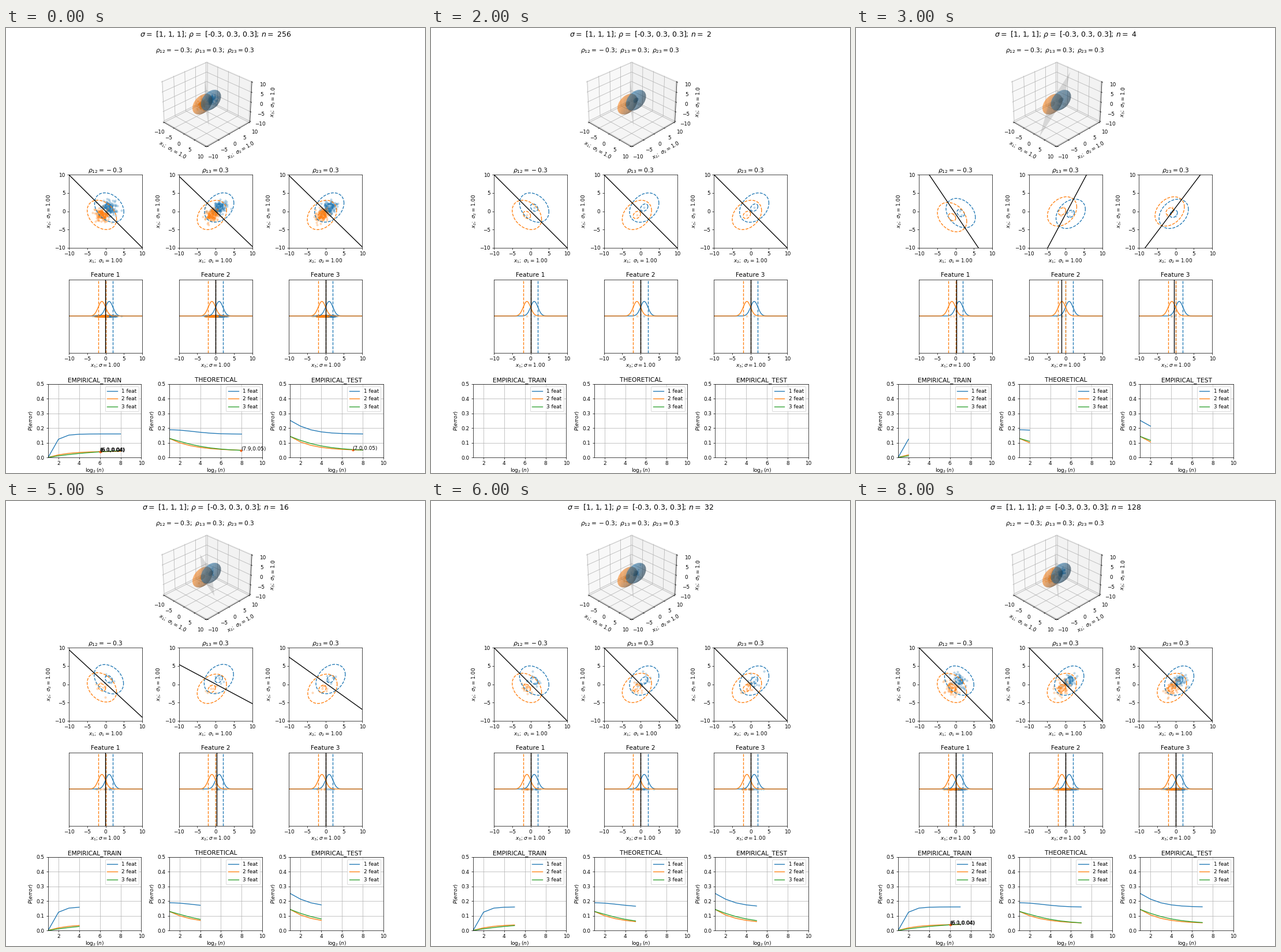
These frames come from a looping animation (726x771 px, 9 s). A matplotlib script:

```python
import numpy as np
import matplotlib.pyplot as plt
from matplotlib.animation import ArtistAnimation

W, H, DPI = 726, 771, 64
BLUE, ORANGE = "C0", "C1"
PAIRS = [(0, 1), (0, 2), (1, 2)]
TICKS = range(-10, 11, 5)
COV = np.array([[1, -.3, .3], [-.3, 1, .3], [.3, .3, 1]])
ROOT = np.linalg.cholesky(COV)
# how far the first sample means lie from the true ones
SHIFT = {BLUE: np.array([.4, -1.5, -1.7]), ORANGE: np.array([.05, -.6, .95])}
CENTER = {BLUE: 1, ORANGE: -1}


def rise(top, rate):
    return lambda k: top * (1 - np.exp(-rate * (k - 1)))


def decay(low, span, scale, power=1):
    return lambda k: low + span * np.exp(-((k - 1) / scale) ** power)


# error against k = log2(n), for 1, 2 and 3 features
ERRORS = {
    "EMPIRICAL_TRAIN": (rise(.16, 1.5), rise(.042, .55), rise(.062, .19)),
    "THEORETICAL": (decay(.159, .03, 3.2, 2), decay(.045, .085, 2.3),
                    decay(.042, .088, 3.1, 1.2)),
    "EMPIRICAL_TEST": (decay(.159, .093, 1.75, 1.1), decay(.047, .096, 2),
                       decay(.043, .1, 2.9, 1.1)),
}

fig = plt.figure(figsize=(W / DPI, H / DPI), dpi=DPI, facecolor="white")


def add_axes(x, y, w, h, **kw):
    return fig.add_axes([x / W, 1 - (y + h) / H, w / W, h / H], **kw)


def rho(i, j):
    return rf"\rho_{{{i + 1}{j + 1}}}={COV[i, j]:.1f}"


def name(i, digits=2):
    return rf"$x_{i + 1};\ \sigma_{i + 1}={1:.{digits}f}$"


def make_cube():
    ax = add_axes(261, 46.3, 168.7, 168.7, projection="3d")
    ax.view_init(elev=30, azim=-45)
    lim = 10 * 25 / 24
    ax.set(xlim=(-lim, lim), ylim=(-lim, lim), zlim=(-lim, lim),
           xticks=TICKS, yticks=TICKS, zticks=TICKS,
           xlabel=name(0, 1), ylabel=name(1, 1), zlabel=name(2, 1))
    ax.set_title("$" + r";\ ".join(rho(i, j) for i, j in PAIRS) + "$",
                 y=1, pad=4.7)
    ax.title.set_y(1)  # 3D axes lower their title
    return ax


def make_pair(k):
    i, j = PAIRS[k]
    ax = add_axes(109 + 190.6 * k, 254, 127, 127)
    ax.set(xlim=(-10, 10), ylim=(-10, 10), xticks=TICKS, yticks=TICKS,
           ylabel=name(j))
    ax.set_xlabel(name(i), labelpad=1)
    ax.set_title(f"${rho(i, j)}$", pad=4.7)
    return ax


def make_feature(k):
    ax = add_axes(109 + 190.6 * k, 435.5, 127, 127)
    ax.set(xlim=(-10, 10), ylim=(-1, 1), xticks=TICKS, yticks=[])
    ax.set_xlabel(rf"$x_{k + 1};\sigma=1.00$", labelpad=1)
    ax.set_title(f"Feature {k + 1}", pad=4.7)
    x = np.linspace(-10, 10, 400)
    for color, mu in CENTER.items():
        ax.plot(x, np.exp(-(x - mu) ** 2 / 2) / np.sqrt(2 * np.pi), color=color)
        for edge in (mu - 1, mu + 1):
            ax.axvline(edge, color=color, ls="--")
    return ax


def make_error(k, title):
    ax = add_axes(73 + 209.7 * k, 617, 161.4, 127)
    ax.set(xlim=(1, 10), ylim=(0, .5), xticks=range(2, 11, 2),
           ylabel="$P(error)$")
    ax.set_xlabel(r"$\log_2(n)$", labelpad=1)
    ax.set_title(title, pad=4.7)
    ax.grid(True)
    for i in range(3):
        ax.plot([], [], color=f"C{i}", label=f"{i + 1} feat")
    ax.legend(loc="upper right")
    return ax


cube = make_cube()
pair_axes = [make_pair(k) for k in range(3)]
feature_axes = [make_feature(k) for k in range(3)]
error_axes = [make_error(k, t) for k, t in enumerate(ERRORS)]

angle = np.linspace(0, 2 * np.pi, 121)
circle = np.array([np.cos(angle), np.sin(angle)])
u, v = np.meshgrid(np.linspace(0, 2 * np.pi, 25), np.linspace(0, np.pi, 17),
                   indexing="ij")
sphere = np.array([np.cos(u) * np.sin(v), np.sin(u) * np.sin(v), np.cos(v)])


def sample_mean(color, k):
    """The error of the mean swings and halves with each doubling of n."""
    swing = np.cos(np.pi / 2 * (k - 2)) * 2.0 ** (2 - k)
    return CENTER[color] + SHIFT[color] * swing


def draw_class(color, mean, count, rng):
    z = rng.standard_normal((3, count))
    z -= z.mean(axis=1, keepdims=True)
    pts = mean[:, None] + ROOT @ z
    dots = dict(s=14, color=color, alpha=.25, linewidths=.8)

    out = [cube.scatter(*pts, s=8, color=color, alpha=.2)]
    for r in (4, 1):
        shell = CENTER[color] + r * np.tensordot(ROOT, sphere, 1)
        out.append(cube.plot_surface(*shell, color=color, alpha=.35,
                                     rstride=1, cstride=1, linewidth=0))
    for ax, pair in zip(pair_axes, PAIRS):
        idx = list(pair)
        out.append(ax.scatter(*pts[idx], **dots))
        root = np.linalg.cholesky(COV[np.ix_(idx, idx)])
        for r in (4, 1):
            ring = mean[idx][:, None] + r * root @ circle
            out += ax.plot(*ring, "--", color=color)
    for ax, values in zip(feature_axes, pts):
        out.append(ax.scatter(values, np.zeros(count), **dots))
    return out


def draw_borders(blue, orange):
    """Linear discriminants in one, two and three features."""
    mid, gap = (blue + orange) / 2, blue - orange
    out = [ax.axvline(m, color="black") for ax, m in zip(feature_axes, mid)]
    for ax, pair in zip(pair_axes, PAIRS):
        idx = list(pair)
        a, b = np.linalg.solve(COV[np.ix_(idx, idx)], gap[idx])
        t = np.array([-40, 40]) / np.hypot(a, b)
        out += ax.plot(mid[idx[0]] - b * t, mid[idx[1]] + a * t, color="black",
                       scalex=False, scaley=False)
    w = np.linalg.solve(COV, gap)
    x, z = np.meshgrid([-6, 6], [-6, 6])
    y = mid[1] - (w[0] * (x - mid[0]) + w[2] * (z - mid[2])) / w[1]
    out.append(cube.plot_surface(x, y, z, color="gray", alpha=.25,
                                 shade=False, linewidth=0))
    return out


def draw_mark(ax, x, y):
    dot, = ax.plot(x, y, "o", ms=4.5, color="#f2611c", mew=0)
    return [dot, ax.text(x, y, f"({x:.1f},{y:.2f})")]


def draw_errors(k):
    out = []
    steps = np.arange(1, k + 1)
    for ax, curves in zip(error_axes, ERRORS.values()):
        for i, curve in enumerate(curves):
            out += ax.plot(steps, curve(steps), color=f"C{i}")
    train, theory, test = error_axes
    for j in range(6, k + 1):
        out += draw_mark(train, 6 + .06 * (j % 2), .04)
    if k == 8:
        out += draw_mark(theory, 7.93, .048) + draw_mark(test, 7.03, .05)
    return out


def draw_step(k):
    n = 2 ** k if k else 0
    head = rf"$\sigma=$ [1, 1, 1]; $\rho=$ [-0.3, 0.3, 0.3]; $n=$ {n}"
    out = [fig.text(.5, 1 - 15 / H, head, fontsize=14,
                    ha="center", va="baseline")]
    if n == 0:
        return out
    rng = np.random.default_rng(n)
    means = {color: sample_mean(color, k) for color in CENTER}
    for color, mean in means.items():
        out += draw_class(color, mean, n // 2, rng)
    return out + draw_borders(means[BLUE], means[ORANGE]) + draw_errors(k)


frames = [draw_step(k) for k in (8, *range(8))]
anim = ArtistAnimation(fig, frames, interval=1000, repeat=True,
                       repeat_delay=0, blit=False)
plt.show()
```
